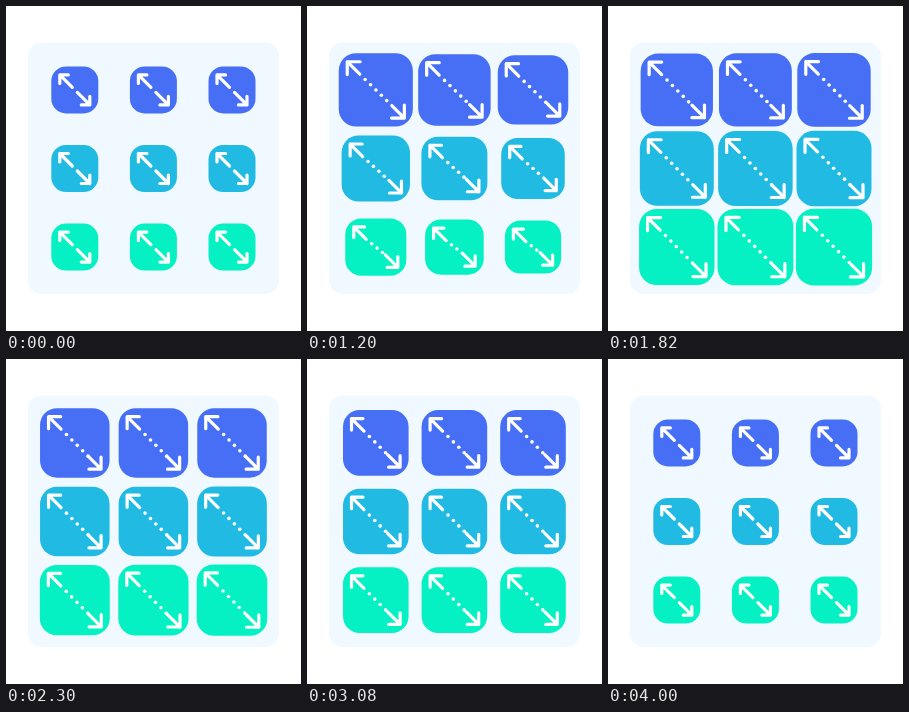
Animation, 295 px wide and 325 px high, one loop 4.02 s. Source, as an HTML page with a canvas:

```html
<!DOCTYPE html>
<html lang="en">
<head>
<meta charset="utf-8">
<title>Resizing tiles</title>
<style>
html, body { margin: 0; width: 100%; height: 100%; overflow: hidden; background: #fff; }
canvas { display: block; width: 295px; height: 325px; }
</style>
</head>
<body>
<canvas></canvas>
<script>
const LOOP = 4020, STAGGER = 1000 / 24, ROW_LAG = STAGGER / 2;
const REST = 47, PEAK = 76.8, SETTLED = 69.5;
const PITCH = 78.6, SHAFT = 12.5, DOT_STEP = 5.4;
const COLORS = ['#466ff5', '#20bae2', '#05f0c3'];

const canvas = document.querySelector('canvas');
const ctx = canvas.getContext('2d');
const ratio = window.devicePixelRatio || 1;
canvas.width = 295 * ratio;
canvas.height = 325 * ratio;
ctx.scale(ratio, ratio);
ctx.lineCap = ctx.lineJoin = 'round';

function ease(time, start, end) {
  const p = Math.min(1, Math.max(0, (time - start) / (end - start)));
  return p * p * (3 - 2 * p);
}

// Growth is delayed per tile; all tiles shrink together.
function sizeAt(time, delay) {
  const local = time - delay;
  return REST
    + (PEAK - REST) * ease(local, 590, 1340)
    - (PEAK - SETTLED) * ease(local, 1340, 2175)
    - (SETTLED - REST) * ease(time, 2905, 3570);
}

function box(x, y, w, h, radius, color) {
  ctx.fillStyle = color;
  ctx.beginPath();
  ctx.roundRect(x, y, w, h, radius);
  ctx.fill();
}

// side is 1 for the lower right arrow and -1 for the upper left one.
function arrow(side, x, y, arm) {
  ctx.beginPath();
  ctx.moveTo(side * (x - arm), side * y);
  ctx.lineTo(side * x, side * y);
  ctx.lineTo(side * x, side * (y - arm));
  ctx.moveTo(side * x, side * y);
  ctx.lineTo(side * (x - SHAFT), side * (y - SHAFT));
  ctx.stroke();
}

function tile(x, y, w, h, color) {
  const tipX = w / 2 - 8.5, tipY = h / 2 - 8.5, arm = 1 + w * 0.16;
  const innerX = tipX - SHAFT, slope = (tipY - SHAFT) / innerX;
  ctx.save();
  ctx.translate(x, y);
  box(-w / 2, -h / 2, w, h, 10 + w * 0.1, color);
  ctx.strokeStyle = ctx.fillStyle = '#fff';
  ctx.lineWidth = 3.2;
  arrow(1, tipX, tipY, arm);
  arrow(-1, tipX, tipY, arm);
  for (let d = DOT_STEP - innerX; d < innerX; d += DOT_STEP) {
    ctx.beginPath();
    ctx.arc(d, d * slope, 1.8, 0, Math.PI * 2);
    ctx.fill();
  }
  ctx.restore();
}

function draw(now) {
  const time = now % LOOP;
  ctx.clearRect(0, 0, 295, 325);
  box(22, 36.5, 251, 251.5, 14, '#f0f9ff');
  for (let i = 0; i < 9; i++) {
    const row = Math.floor(i / 3), col = i % 3, delay = i * STAGGER;
    const w = sizeAt(time, delay);
    const h = sizeAt(time, delay + (row + 1) * ROW_LAG);
    tile(68.8 + col * PITCH, 83.9 + row * PITCH, w, h, COLORS[row]);
  }
}

const begin = performance.now();
function loop() {
  draw(performance.now() - begin);
  requestAnimationFrame(loop);
}
loop();
</script>
</body>
</html>
```
